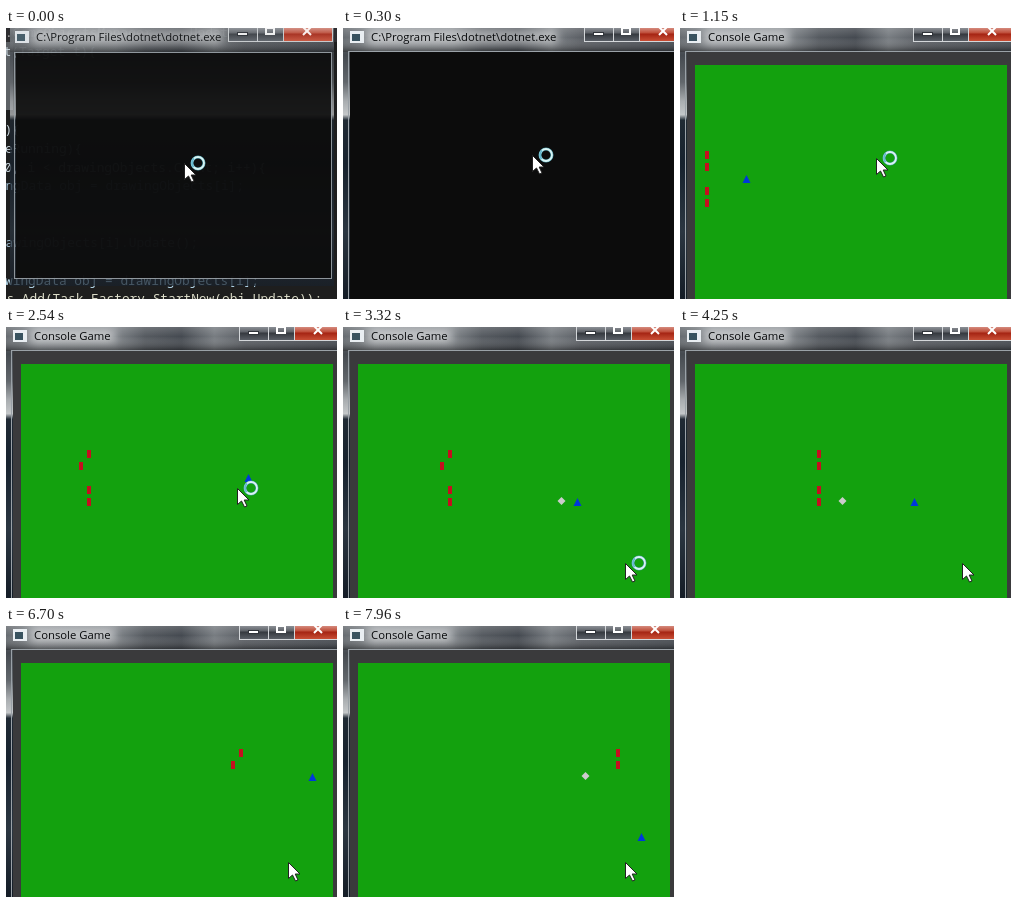
Animation, 331 px wide and 271 px high, one loop 8000 ms. Source, as an HTML page with a canvas:

```html
<!DOCTYPE html>
<html lang="en">
<head>
<meta charset="utf-8">
<title>Console Game</title>
<style>
html, body { margin: 0; width: 331px; height: 271px; overflow: hidden; background: #0c0c0c; }
canvas { display: block; }
</style>
</head>
<body>
<canvas id="stage" width="331" height="271"></canvas>
<script>
const W = 331, H = 271, LOOP = 8000;
const c = document.getElementById('stage').getContext('2d');
const GREEN = '#13a10e', RED = '#c50f1f', BLUE = '#0037da', BLACK = '#0c0c0c';

// Tracks: [time, x, y]
const mouse = [[70, 178, 135], [300, 189, 127], [690, 189, 127], [980, 196, 130],
  [1610, 196, 130], [2390, 231, 161], [2540, 231, 161], [3250, 282, 236]];
const player = [[1250, 63, 147], [1350, 71, 147], [1610, 71, 147], [2390, 239, 147],
  [2600, 239, 147], [2750, 231, 147], [2850, 231, 147], [3050, 231, 171],
  [4500, 231, 171], [4640, 231, 159], [5500, 231, 159], [5780, 247, 159],
  [6050, 247, 159], [6500, 303, 159], [6540, 303, 147], [6800, 303, 147],
  [6900, 295, 147], [7350, 295, 147], [7900, 295, 207]];

const marchTimes = [1230, 1460, 1610, 1850, 2080, 2310, 2470, 2770, 3020, 3320, 3470,
  3620, 3850, 4100, 4330, 4570, 4720, 4950, 5180, 5430, 5560, 5870, 6100, 6320, 6550,
  6700, 6930, 7160, 7400, 7630, 7850];
const enemies = [
  { y: 123, lag: 0, end: LOOP }, { y: 135, lag: 75, end: LOOP },
  { y: 159, lag: 0, end: 5320 }, { y: 171, lag: 0, end: 4570 }];
const bullets = [
  { start: 3195, end: 4570, x: 226, y: 174, step: 125, max: 9 },
  { start: 4720, end: 5320, x: 226, y: 162, step: 120, max: 9 },
  { start: 7290, end: LOOP, x: 290, y: 150, step: 110, max: 9 }];

// Right edge, baseline, text, colour
const code = [
  [230, 9, 'meGame.GameObjectsManager  ›  Update', '#b8b8b8'],
  [90, 28, 't(Target t){', '#c8d4dc'],
  [14, 106, '){', '#c8d4dc'],
  [76, 125, 'eRunning){', '#c8d4dc'],
  [260, 144, '0, i < drawingObjects.Count; i++){', '#c8d4dc'],
  [238, 162, 'ingData obj = drawingObjects[i];', '#9cb8cc'],
  [192, 219, 'awingObjects[i].Update();', '#9cb8cc'],
  [253, 257, 'awingData obj = drawingObjects[i];', '#b8dcf0'],
  [316, 275, 's.Add(Task.Factory.StartNew(obj.Update));', '#dcdcc8']];

const mix = (a, b, p) => a + (b - a) * p;
const snap = (v, origin, size) => origin + size * Math.round((v - origin) / size);

function at(track, t) {
  const i = track.findIndex(k => k[0] > t);
  if (i === 0) return track[0].slice(1);
  if (i < 0) return track[track.length - 1].slice(1);
  const a = track[i - 1], b = track[i], p = (t - a[0]) / (b[0] - a[0]);
  return [mix(a[1], b[1], p), mix(a[2], b[2], p)];
}

function rect(x, y, w, h, fill) {
  c.fillStyle = fill;
  c.fillRect(x, y, w, h);
}

function poly(points, fill, line) {
  c.beginPath();
  points.forEach(([x, y]) => c.lineTo(x, y));
  c.closePath();
  c.fillStyle = fill;
  c.fill();
  if (line) { c.strokeStyle = line; c.lineWidth = 1; c.stroke(); }
}

function blend(x0, y0, x1, y1, stops) {
  const g = c.createLinearGradient(x0, y0, x1, y1);
  stops.forEach(([p, color]) => g.addColorStop(p, color));
  return g;
}

function editor() {
  rect(0, 0, W, H, '#1e1e1e');
  rect(0, 0, W, 14, '#2d2d30');
  rect(0, 14, 7, 68, '#5c6064');
  c.font = '12.83px "Noto Sans Mono", monospace';
  c.textAlign = 'right';
  for (const [x, y, text, color] of code) {
    c.fillStyle = color;
    c.fillText(text, x, y);
  }
  c.textAlign = 'left';
}

function glass() {
  rect(0, 0, W, H, blend(0, 0, 0, H, [[0, '#777b80'], [.1, '#454a50'], [.2, '#62676c'],
    [.27, '#a9adb0'], [.32, '#c4c7c9'], [.34, '#202a34'], [.5, '#17222e'],
    [.75, '#2b3641'], [1, '#141c26']]));
  rect(0, 0, W, 24, blend(0, 0, W, 0, [[0, '#62676c'], [.1, '#858a8f'], [.33, '#7c8186'],
    [.42, '#50555b'], [.53, '#3f444b'], [.63, '#73787d'], [.72, '#565a60'], [1, '#40454c']]));
  rect(0, 0, W, 24, blend(0, 0, 0, 24, [[0, '#ffffff30'], [.4, '#ffffff08'], [1, '#00000070']]));
}

function titleBar(text, x) {
  c.save();
  c.filter = 'blur(5px)';
  rect(x - 4, 3, text.length > 20 ? 190 : 84, 12, '#ffffff90');
  c.restore();
  rect(x - 21, 3, 14, 12, '#e9eef2');
  rect(x - 19, 6, 8, 7, '#38525f');
  c.font = '11.3px "Open Sans", sans-serif';
  c.fillStyle = '#080a0c';
  c.fillText(text, x, 13);
}

function buttons(x) {
  const grey = blend(0, 0, 0, 13, [[0, '#8b8f95'], [.4, '#5c6066'], [.45, '#34383e'], [1, '#595e65']]);
  const red = blend(0, 0, 0, 13, [[0, '#d58a7d'], [.4, '#bd4a36'], [.45, '#a42312'], [1, '#c84e35']]);
  rect(x, 0, 105, 14, '#d4d7da');
  rect(x + 1, 0, 28, 13, grey);
  rect(x + 30, 0, 25, 13, grey);
  rect(x + 56, 0, 48, 13, red);
  rect(x + 9, 4, 11, 4, '#30343a');
  rect(x + 10, 5, 9, 2, '#fff');
  c.strokeStyle = '#fff';
  c.lineWidth = 2;
  c.strokeRect(x + 38, 0, 8, 6);
  c.beginPath();
  c.moveTo(x + 75, -1); c.lineTo(x + 83, 7);
  c.moveTo(x + 83, -1); c.lineTo(x + 75, 7);
  c.stroke();
}

// Window frame; p = 0 while it opens, 1 once it is in place
function frame(t, p) {
  const left = mix(10, 7, p), top = mix(25, 24, p);
  const right = mix(325, 345, p), bottom = mix(250, 280, p);
  c.save();
  c.beginPath();
  c.rect(mix(4, 0, p), 0, right - left + mix(9, 20, p), bottom + 8);
  c.clip();
  c.globalAlpha = mix(.72, 1, p);
  glass();
  c.globalAlpha = mix(.9, 1, p);
  rect(left, top, right - left, bottom - top, BLACK);
  c.strokeStyle = '#9aa1a7';
  c.lineWidth = 1;
  c.strokeRect(Math.round(left) - 1.5, Math.round(top) - .5, right - left + 2, bottom - top + 1);
  titleBar(t < 690 ? 'C:\\Program Files\\dotnet\\dotnet.exe' : 'Console Game', mix(30, 28, p));
  buttons(t < 760 ? Math.round(mix(222, 241, p)) : 233);
  c.restore();
}

function field(t) {
  const end = 133 + 12 * Math.floor((t - 690) / 24);
  rect(7, 24, W, end - 24, '#3a3a3c');
  rect(15, 37, 312, end - 37, GREEN);
  if (end < H) rect(319, end - 12, 12, 12, BLACK);
}

function actors(t) {
  for (const e of enemies) {
    if (t >= e.end) continue;
    const steps = marchTimes.filter(m => m + e.lag <= t).length;
    rect(25 + 8 * steps, e.y, 4, 8, RED);
  }
  for (const b of bullets) {
    if (t < b.start || t >= b.end) continue;
    const x = b.x - 8 * Math.min(b.max, Math.floor((t - b.start) / b.step)) + .5, y = b.y;
    poly([[x, y - 4], [x + 4, y], [x, y + 4], [x - 4, y]], '#ccc');
  }
  const [px, py] = at(player, t);
  const x = snap(px, 63, 8), y = snap(py, 147, 12);
  poly([[x + 3.5, y], [x + 7.5, y + 8], [x - .5, y + 8]], BLUE);
}

function pointer(t) {
  const [x, y] = at(mouse, t).map(Math.round);
  if (t < 4100) {
    const ring = (color, width, from, to) => {
      c.beginPath();
      c.arc(x + 14, y, 6, from, to);
      c.strokeStyle = color;
      c.lineWidth = width;
      c.stroke();
    };
    ring('#4d9cab', 3, 0, 7);
    ring('#d9f4f4', 1.8, 0, 7);
    ring('#62b8cf', 1.8, 2.4, 4);
  }
  const arrow = [[0, 0], [0, 16], [4, 12.5], [7, 18.5], [9.5, 17.5], [6.7, 11.5], [11.5, 11.5]];
  poly(arrow.map(([dx, dy]) => [x + dx + .5, y + dy + .5]), '#fff', '#222');
}

function draw(t) {
  const open = t < 70 ? 0 : t < 220 ? .5 : t < 300 ? .85 : 1;
  c.clearRect(0, 0, W, H);
  if (open < 1) editor();
  frame(t, open);
  if (t >= 440 && t < 520) rect(7, 34, 8, 2, '#ccc');
  if (t >= 690) field(t);
  if (t >= 980) actors(t);
  pointer(t);
}

const begin = performance.now();
function tick() {
  draw((performance.now() - begin) % LOOP);
  requestAnimationFrame(tick);
}
tick();
</script>
</body>
</html>
```
